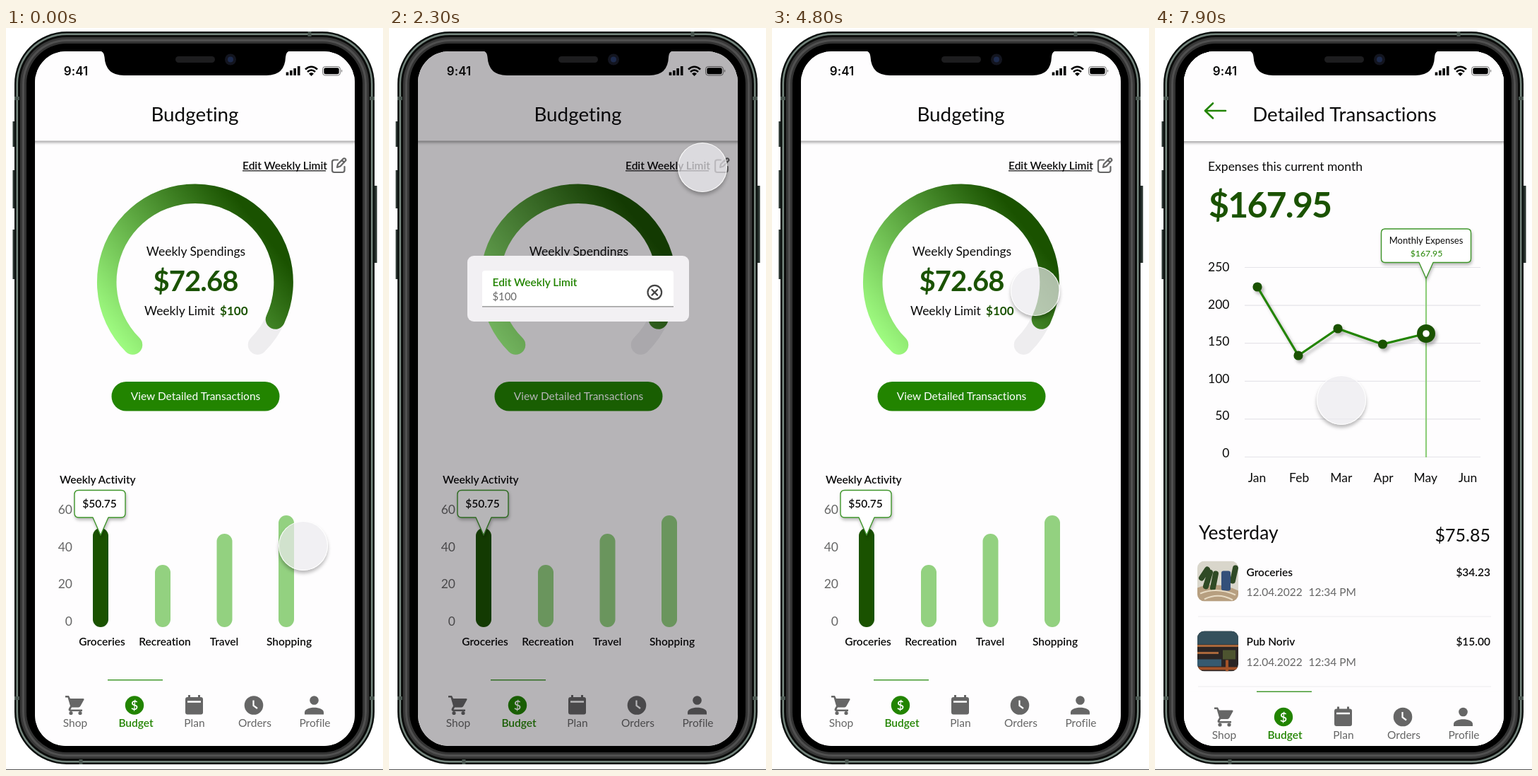
Write an HTML page that moves like this. It is 534 px wide and 1049 px high and loops after 8000 ms.

```html
<!DOCTYPE html>
<html lang="en">
<head>
<meta charset="utf-8">
<title>Budgeting app</title>
<style>
  html, body { margin: 0; width: 100%; height: 100%; overflow: hidden; background: #fff; }
  svg { position: absolute; left: 0; top: 0; width: 534px; height: 1049px; }
  text { font: 15.5px Lato, sans-serif; font-variant-ligatures: none; fill: #0b0b0b; white-space: pre; }
  .mid { text-anchor: middle; }
  .end { text-anchor: end; }
  .med { font-weight: 600; }
  .bold { font-weight: 700; }
  .title { font-size: 27.8px; }
  .body { font-size: 17.5px; }
  .grey { fill: #666; }
  .green { fill: #228400; }
  .dark { fill: #1a5200; }
  .page { fill: #fefdfe; }
  .line { fill: none; stroke: #666; stroke-width: 2.2; stroke-linecap: round; stroke-linejoin: round; }
  .tip { fill: #fff; stroke: #3f962b; stroke-width: 1.4; stroke-linejoin: round; filter: drop-shadow(1px 3px 2px #0004); }
  .head { fill: #fefdfe; filter: drop-shadow(0 2px 2px #0006); }
  #touch {
    position: absolute; left: -35px; top: -35px; width: 70px; height: 70px; box-sizing: border-box;
    border: 1.7px solid #fffffff0; border-radius: 50%;
    background: rgba(236, 234, 238, .7); box-shadow: 0 4px 5px #0004;
  }
</style>
</head>
<body>
<svg viewBox="0 0 534 1049">
  <defs>
    <clipPath id="screen"><rect x="41" y="33" width="453" height="982" rx="44"/></clipPath>
    <clipPath id="thumb"><rect width="58" height="57" rx="10"/></clipPath>
    <linearGradient id="arc" gradientUnits="userSpaceOnUse" x1="160" y1="450" x2="365" y2="290">
      <stop stop-color="#a0fd82"/><stop offset="1" stop-color="#1a5200"/>
    </linearGradient>
    <g id="nav">
      <path class="page" d="M41 921H494V1050H41Z"/>
      <path d="M144 921.700H222" stroke="#459a30" stroke-width="1.400"/>
      <g class="grey">
        <path d="M84 944h5l2 4h18.500q1.500 0 1 1.500l-5 9q-1 2-3 2H93l-1.500 3H108v2.500H91q-3.500-.5-2-4l2-3.500L87.500 946.500H84Z"/>
        <circle cx="92" cy="968.500" r="2.600"/><circle cx="105" cy="968.500" r="2.600"/>
        <rect x="254" y="946" width="25" height="24.500" rx="3"/>
        <path d="M258 943h3v5h-3ZM272 943h3v5h-3Z"/>
        <circle cx="351" cy="957.500" r="13.300"/>
        <circle cx="436.500" cy="950.500" r="6.300"/>
        <path d="M423 970.500v-3c0-9 27-9 27 0v3Z"/>
      </g>
      <path d="M257 952.500H276" stroke="#fff" stroke-width="2.500"/>
      <path d="M350.500 950.500V958L356 962" fill="none" stroke="#fff" stroke-width="2.200"/>
      <circle class="green" cx="182" cy="957.500" r="13.200"/>
      <text class="mid med" x="182" y="964" style="font-size:18px;fill:#fff">$</text>
      <text class="mid grey" x="98" y="988">Shop</text>
      <text class="mid med green" x="184" y="988">Budget</text>
      <text class="mid grey" x="267" y="988">Plan</text>
      <text class="mid grey" x="352.500" y="988">Orders</text>
      <text class="mid grey" x="437.500" y="988">Profile</text>
    </g>
  </defs>

  <!-- phone body -->
  <path d="M0 1048.500H534" stroke="#555"/>
  <path d="M11.500 132V168M11.500 201V255M11.500 285V355M523.500 223V332" stroke="#26302c" stroke-width="4"/>
  <rect x="12" y="5" width="510" height="1036" rx="74" fill="#0a0f0d"/>
  <rect x="14.500" y="7.500" width="505" height="1031" rx="71.500" fill="#74857d"/>
  <rect x="17" y="10" width="500" height="1026" rx="69" fill="#0b0c0b"/>
  <rect x="20" y="13" width="494" height="1020" rx="66" fill="#383838"/>
  <rect x="23" y="16" width="488" height="1014" rx="63" fill="#505050"/>
  <rect x="26" y="19" width="482" height="1008" rx="60" fill="#333"/>
  <rect x="29" y="22" width="476" height="1002" rx="57" fill="#000"/>
  <path d="M12 99.500h7M515 99.500h7M12 947.500h7M515 947.500h7M430 5v7M106 1034v7" stroke="#4a5751" stroke-width="5"/>

  <g clip-path="url(#screen)">
    <g id="budget">
      <rect class="page" x="41" y="33" width="453" height="982"/>
      <rect class="head" x="31" y="23" width="473" height="136.500"/>
      <text class="mid title" x="267.500" y="132">Budgeting</text>
      <text class="med" x="335" y="199.500">Edit Weekly Limit</text>
      <path d="M335 201.800H453" stroke="#111" stroke-width="1.200"/>
      <path class="line" d="M470 186.500h-5q-3 0-3 3v11.500q0 3 3 3h11.500q3 0 3-3v-5M469 197l1-4.500 8-8q3-1 3.500 2.500l-8 8.500ZM476 187l3 3"/>

      <g fill="none" stroke-width="27.500" stroke-linecap="round">
        <path d="M179.500 448A125.200 125.200 0 1 1 356.500 448" stroke="#eeedef"/>
        <path d="M179.500 448A125.200 125.200 0 1 1 381.500 412" stroke="url(#arc)"/>
      </g>
      <text class="mid body" x="269" y="322">Weekly Spendings</text>
      <text class="mid bold dark" x="268.500" y="372" style="font-size:40px;letter-spacing:-.9px">$72.68</text>
      <text class="body" x="196" y="406">Weekly Limit</text>
      <text class="end bold dark" x="342.500" y="406" style="font-size:17px">$100</text>

      <rect class="green" x="149.500" y="500" width="238" height="41.500" rx="20.700"/>
      <text class="mid" x="268.500" y="526" style="fill:#fff">View Detailed Transactions</text>

      <text class="med" x="76" y="644">Weekly Activity</text>
      <g id="bars"></g>
      <path class="tip" d="M103 653.500H163q6 0 6 6V686q0 6-6 6H145L134 717 123 692H103q-6 0-6-6V659.500q0-6 6-6Z"/>
      <text class="mid med" x="132.500" y="678">$50.75</text>
      <use href="#nav"/>

      <g id="dialog">
        <rect x="41" y="33" width="453" height="982" fill="#050008" opacity=".29"/>
        <rect x="111" y="322" width="314" height="93" rx="9" fill="#f2f0f3"/>
        <path d="M132 394V347q0-4 4-4H399q4 0 4 4V394Z" fill="#fff"/>
        <path d="M132 393.800H403" stroke="#888" stroke-width="1.200"/>
        <text class="med green" x="146.500" y="365">Edit Weekly Limit</text>
        <text class="grey" x="146.500" y="385" style="font-size:14.800px">$100</text>
        <circle class="line" cx="376.300" cy="373.700" r="9.800" style="stroke:#444"/>
        <path class="line" d="M372.500 370l7.600 7.600m0-7.600l-7.600 7.600" style="stroke:#444"/>
      </g>
    </g>

    <g id="details">
      <rect class="page" x="41" y="33" width="453" height="982"/>
      <rect class="head" x="31" y="23" width="473" height="137"/>
      <path class="line" d="M100 117H71M82 106.500L71 117L82 127.500" style="stroke:#228400;stroke-width:2.600"/>
      <text class="mid title" x="268.500" y="132">Detailed Transactions</text>
      <text class="body" x="75" y="202">Expenses this current month</text>
      <text class="bold dark" x="76" y="268" style="font-size:50px;letter-spacing:-1.800px">$167.95</text>

      <g id="grid"></g>
      <path d="M384 345V607" stroke="#8fce7c" stroke-width="2.200"/>
      <g style="filter:drop-shadow(3px 4px 2px #0004)">
        <path d="M145 366L203 463L259 425L322 447L384 432" fill="none" stroke="#228400" stroke-width="3.200"/>
        <g class="dark">
          <circle cx="145" cy="366" r="6.600"/><circle cx="203" cy="463" r="6.600"/>
          <circle cx="259" cy="425" r="6.600"/><circle cx="322.500" cy="447" r="6.600"/>
          <circle cx="384" cy="432" r="13"/>
        </g>
        <circle cx="384" cy="432" r="4.800" fill="#fff"/>
      </g>
      <path class="tip" d="M325 284H442q5.500 0 5.500 5.500V326q0 5.500-5.500 5.500H394L384 354 374 331.500H326q-5.500 0-5.500-5.500V289.500q0-5.500 5.500-5.500Z"/>
      <text class="mid" x="384" y="305" style="font-size:13px">Monthly Expenses</text>
      <text class="mid green" x="384.500" y="323" style="font-size:12.300px">$167.95</text>

      <text x="62" y="723" style="font-size:26.400px">Yesterday</text>
      <text class="end" x="475" y="726" style="font-size:25px">$75.85</text>
      <path d="M61 832H476M61 931H476" stroke="#ecebee"/>
      <g transform="translate(60 753.500)" clip-path="url(#thumb)">
        <rect width="58" height="57" fill="#d9d6cb"/>
        <path d="M0 38Q28 28 58 42V57H0Z" fill="#b79f80"/>
        <path d="M12 36L18 16M22 38L26 18M6 24L14 12M50 28L54 10" stroke="#2f4a25" stroke-width="8" stroke-linecap="round"/>
        <rect x="34" y="14" width="13" height="28" rx="3" fill="#34507a"/>
        <path d="M4 46Q28 36 54 48M10 54Q30 44 50 55" fill="none" stroke="#e8dcc5" stroke-width="2"/>
      </g>
      <g transform="translate(60 852.500)" clip-path="url(#thumb)">
        <rect width="58" height="57" fill="#2b2524"/>
        <rect width="58" height="19" fill="#35505c"/>
        <path d="M0 21H58M0 31H30" stroke="#a9673b" stroke-width="3"/>
        <path d="M0 40H34V50H0Z" fill="#365a70"/>
        <path d="M36 27H54V40H36Z" fill="#4d5430"/>
        <path d="M0 53H58M42 41V57" stroke="#a35329" stroke-width="4"/>
      </g>
      <text class="med" x="129.500" y="775">Groceries</text>
      <text class="med" x="129.500" y="873">Pub Noriv</text>
      <text class="end med" x="475" y="774.500">$34.23</text>
      <text class="end med" x="475" y="873">$15.00</text>
      <g id="dates"></g>
      <use href="#nav" y="16.500"/>
    </g>
  </g>

  <!-- notch and status bar -->
  <path d="M132 32Q139 33 139.500 41Q141 67 167 67H369Q395 67 396 41Q396.500 33 403 32Z"/>
  <rect x="240" y="40" width="56" height="9" rx="4.500" fill="#1d1d1f"/>
  <circle cx="318" cy="44.500" r="8" fill="#13151f"/>
  <circle cx="318" cy="44.500" r="4" fill="#1d2a4c"/>
  <text class="mid med" x="99" y="66.500" style="font-family:Inter,sans-serif;font-size:17px">9:41</text>
  <path d="M398.500 67V62.500M403.800 67V60M409.100 67V57M414.700 67V54" stroke="#000" stroke-width="3.600"/>
  <g fill="none" stroke="#000" stroke-width="2.600">
    <path d="M424 58.500Q432.500 51 441 58.500M427 62Q432.500 57 438 62"/>
  </g>
  <path d="M429 64.500Q432.500 61.500 436 64.500L432.500 68Z"/>
  <rect x="448.500" y="54.500" width="25" height="12.500" rx="3.800" fill="none" stroke="#0008"/>
  <rect x="450.300" y="56.300" width="21.400" height="8.900" rx="2.300"/>
  <path d="M475 58.500q2.500 2 0 4.500Z" fill="#0008"/>
</svg>
<div id="touch"></div>

<script>
  const LOOP = 8000;
  const $ = id => document.getElementById(id);
  const label = (x, y, cls, str) => `<text x="${x}" y="${y}" class="${cls}">${str}</text>`;

  const bars = [["Groceries", 134, 707, 136], ["Recreation", 222, 759, 225],
                ["Travel", 309.5, 715, 309], ["Shopping", 397, 689, 401]];
  $("bars").innerHTML =
    [60, 40, 20, 0].map((v, i) => label(94, 687 + i * 52.6, "end body grey", v)).join("") +
    bars.map(([name, x, top, textX], i) =>
      `<rect x="${x - 11}" y="${top}" width="22" height="${847 - top}" rx="11" fill="${i ? "#93d180" : "#1a5200"}"/>` +
      label(textX, 873, "mid med", name)).join("");

  $("grid").innerHTML =
    [250, 200, 150, 100, 50, 0].map((v, i) =>
      `<path d="M127 ${338.5 + i * 53.6}H461" stroke="#e5e4e9" stroke-width="1.2"/>` +
      label(105.5, 344 + i * 52.6, "end body", v)).join("") +
    ["Jan", "Feb", "Mar", "Apr", "May", "Jun"].map((m, i) =>
      label(144.5 + i * 59.7, 642, "mid body", m)).join("");

  $("dates").innerHTML = [803, 901.5].map(y =>
    label(129.5, y, "grey", "12.04.2022") + label(217.5, y, "grey", "12:34 PM")).join("");

  const ramp = (t, from, to) => Math.min(1, Math.max(0, (t - from) / (to - from)));
  const ease = p => p * p * (3 - 2 * p);
  const bend = (a, b, c, p) => a * (1 - p) ** 2 + 2 * b * p * (1 - p) + c * p * p;

  // start, end, control x, y, target x, y
  const moves = [
    [780, 1930, 447, 461, 444, 197],
    [2700, 3800, 415, 285, 384, 382],
    [4200, 4800, 378, 377, 373, 372],
    [5400, 6700, 320, 445, 265, 519],
    [6950, 7800, 265, 522, 264, 526],
  ];

  function draw(now) {
    const t = now % LOOP;
    let x = 421, y = 732;
    for (const [start, end, cx, cy, tx, ty] of moves) {
      const p = ease(ramp(t, start, end));
      x = bend(x, cx, tx, p);
      y = bend(y, cy, ty, p);
    }
    $("touch").style.transform = `translate(${x}px, ${y}px)`;
    $("dialog").style.opacity = ramp(t, 2050, 2250) - ramp(t, 4500, 4700);
    $("details").style.opacity = ramp(t, 7250, 7450);
    requestAnimationFrame(draw);
  }
  draw(0);
</script>
</body>
</html>
```
